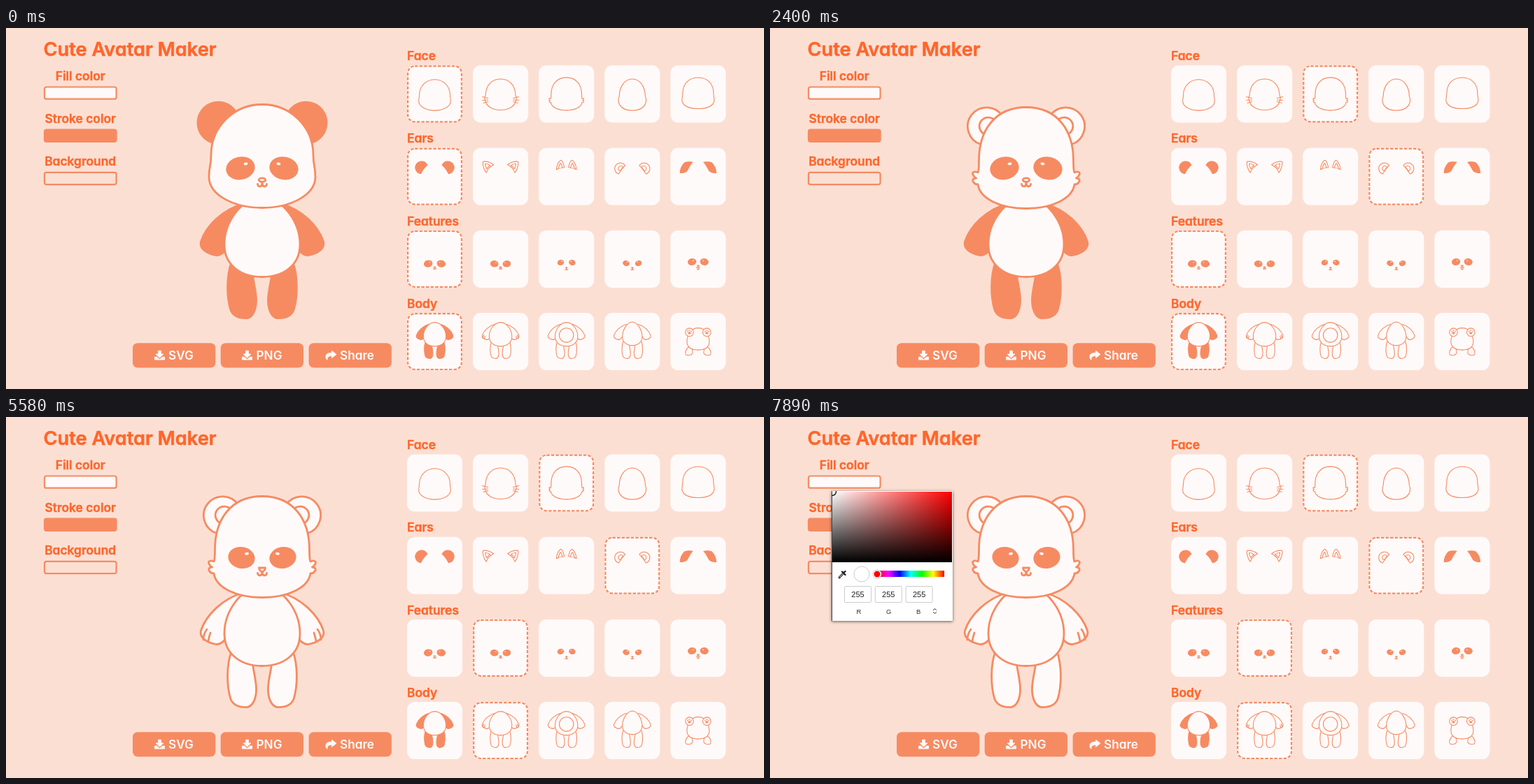
Write an HTML page that moves like this. It is 1083 px wide and 517 px high and loops after 8000 ms.

```html
<!DOCTYPE html>
<html lang="en">
<head>
<meta charset="utf-8">
<title>Cute Avatar Maker</title>
<style>
:root { --bg: #fcdfd3; --ink: #f68b62; --snow: #fffafa; --text: #ff662b; }
html, body { margin: 0; width: 100%; height: 100%; overflow: hidden; background: var(--bg); }
svg { display: block; }
#stage { position: absolute; left: 0; top: 0; }

text { font: 600 17.4px Inter, "Open Sans", sans-serif; font-feature-settings: "cv11"; fill: var(--text); stroke: var(--text); stroke-width: .4; stroke-linejoin: round; }
.title { font-size: 27.2px; stroke-width: .6; }
.label { text-anchor: middle; }
.button text { font-size: 17.2px; fill: var(--snow); stroke: none; }
.button rect { fill: var(--ink); }
.button path { fill: var(--snow); stroke: var(--snow); stroke-width: .8; stroke-linejoin: round; }
.tile { fill: var(--snow); }
.ring { fill: none; stroke: var(--ink); stroke-width: 2.2; stroke-dasharray: 4.4 2.18; }
.swatch { stroke: var(--ink); stroke-width: 2.2; }
.art { fill: var(--snow); stroke: var(--ink); stroke-width: 2.8; stroke-linecap: round; stroke-linejoin: round; }
.small { stroke-width: 1.1; }
.shrunk { stroke-width: 3.6; }
.solid { fill: var(--ink); }
.line { fill: none; }
.glint { fill: var(--snow); stroke: none; }

.off, .on { animation: 8s step-end infinite; }
.face.off { animation-name: face-off; }
.face.on { animation-name: face-on; }
.ears.off { animation-name: ears-off; }
.ears.on { animation-name: ears-on; }
.features.off { animation-name: features-off; }
.features.on { animation-name: features-on; }
.body.off { animation-name: body-off; }
.body.on { animation-name: body-on; }
.shadow.on { animation-name: shadow-on; }
.panel.on { animation-name: panel-on; }
@keyframes face-off { 0% { opacity: 1 } 10.875%, 100% { opacity: 0 } }
@keyframes face-on { 0% { opacity: 0 } 10.875%, 100% { opacity: 1 } }
@keyframes ears-off { 0% { opacity: 1 } 30%, 100% { opacity: 0 } }
@keyframes ears-on { 0% { opacity: 0 } 30%, 100% { opacity: 1 } }
@keyframes features-off { 0% { opacity: 1 } 48.375%, 100% { opacity: 0 } }
@keyframes features-on { 0% { opacity: 0 } 48.375%, 100% { opacity: 1 } }
@keyframes body-off { 0% { opacity: 1 } 69.75%, 100% { opacity: 0 } }
@keyframes body-on { 0% { opacity: 0 } 69.75%, 100% { opacity: 1 } }
@keyframes shadow-on { 0% { opacity: 0 } 97.875%, 100% { opacity: 1 } }
@keyframes panel-on { 0% { opacity: 0 } 98.625%, 100% { opacity: 1 } }

.shadow, .panel { position: absolute; left: 88px; top: 106px; width: 173px; height: 186px; }
.shadow { box-shadow: 0 1px 4px rgba(0, 0, 0, .62); }
.panel { background: #fff; overflow: hidden; }
.panel svg { position: absolute; left: 0; top: 0; }
.panel text { font: 11px "Liberation Sans", Arial, sans-serif; fill: #222; stroke: none; text-anchor: middle; }
.panel .unit { font-size: 9.5px; fill: #333; }
.shade { position: absolute; left: 1px; top: 1px; width: 171px; height: 101px; background: linear-gradient(to top, #000, transparent), linear-gradient(to right, #fff, #f00); }
.hue { position: absolute; left: 65px; top: 114px; width: 96px; height: 9px; background: linear-gradient(to right, #f00, #f0f, #00f, #0ff, #0f0, #ff0, #f00); }
</style>
</head>
<body>
<svg id="stage" width="1083" height="517" viewBox="0 0 1083 517"></svg>
<div class="shadow on"></div>
<div class="panel on">
  <div class="shade"></div>
  <div class="hue"></div>
  <svg id="picker" width="173" height="186"></svg>
</div>
<script>
const path = (d, kind = '') => `<path class="${kind}" d="${d}"/>`;
const oval = (x, y, rx, ry, kind = '', turn = 0) =>
  `<ellipse class="${kind}" cx="${x}" cy="${y}" rx="${rx}" ry="${ry}" transform="rotate(${turn} ${x} ${y})"/>`;
const mirror = s => s + `<g transform="scale(-1 1)">${s}</g>`;
const group = (s, kind, move = '') => `<g class="${kind}" transform="${move}">${s}</g>`;
const label = (s, x, y, kind = '') => `<text class="${kind}" x="${x}" y="${y}">${s}</text>`;
const box = (x, y, w, h, r, more) => `<rect x="${x}" y="${y}" width="${w}" height="${h}" rx="${r}" ${more}/>`;

// Avatar parts: x is measured from the axis of symmetry.
const roundFace = mirror(path('M0 109.5C41 109.5 73 142 73 182C73 199 76 197 76 213C76 240 39 257.5 0 257.5'));
const tuftFace = mirror(path('M0 113.5C44 113.5 67.500 146 67.500 190C67.500 200 67.500 205 69 207C73 205 78 206 76 210C75 213 73 214 71.500 215C77 215.500 77 219 75 221C73.500 224 71 224 69 224C66 244 38 258.500 0 258.500'));

const pandaEars = mirror(path('M35.500 124A29.500 29.500 0 1 1 66 165C59 150 49 135 35.500 124Z', 'solid'));
const bearEars = mirror(
  path('M34 126A27 27 0 1 1 65 166.500C57 152 46 138 34 126Z') +
  path('M44 133.500A12.500 12.500 0 1 1 58 152.500Z'));

const mouth = path('M0 221V223C.5 228 6.500 228 6.500 223.500', 'line');
const eye = (x, y, rx, ry, turn, gx, gy) =>
  oval(x, y, rx, ry, 'solid', turn) + oval(gx, gy, 2.9, 1.9, 'glint', 10);
const softEyes = mirror(eye(31, 200.8, 19.4, 15, 12, 23.5, 194.6) + mouth) + oval(0, 217.6, 4.8, 2.8);
const sharpEyes = mirror(eye(29.5, 201.5, 17.8, 14, -10, 22, 195.8) + mouth) +
  path('M-4.5 216H4.5C4.500 219 1.500 221.500 0 221.500S-4.500 219 -4.500 216Z');

const limbs = kind => mirror(
  path('M44 336C51 355 51 385 45 404C41 414 31 416 21 415.500C13 414 8 402 8.500 388C9 375 13 362 14 350', kind) +
  path('M28 252C56 260 80 283 87.500 306C90 316 79 323 66 325.500C58 326 51 317 47 309', kind));
const belly = mirror(path('M0 243C31 243 54 280 54 310C54 340 30 356.500 0 356.500'));
const slimBelly = mirror(path('M0 241C22 241 47 276 47 312C47 338 26 353 0 353'));
const fingers = mirror(path('M79 304C82 308 84 314 84 319M74 309C75 313 77 318 77 322', 'line'));
const pandaBody = limbs('solid') + belly;
const bearBody = limbs('') + belly + fingers;

// Thumbnails: big parts shrink, the rest is drawn in tile units.
const shrink = (s, top = 42, k = .3) => group(s, 'art shrunk', `scale(${k}) translate(0 ${-top})`);
const tiny = s => group(s, 'art small');
const tinyEyes = (x, y, rx, ry, turn) =>
  mirror(oval(x, y, rx, ry, 'solid', turn) + oval(x - 1.6, y - 1.7, .9, .6, 'glint'));
const tinyMouth = mirror(path('M0 53.500V55.500C.3 57 1.800 57 2 55.800', 'line')) + path('M-1.200 53H1.200L0 54Z', 'solid');

const rows = [
  { name: 'Face', kind: 'face', from: 0, to: 2, thumbs: [
    shrink(roundFace),
    tiny(mirror(path('M0 19.500C14 19.500 21 30 21.500 43C23 46 22.500 50 21.500 52C19 60 10 64 0 64') +
      path('M18 47L26 45M18 49.500L26 50M18 52L24.500 54', 'line'))),
    shrink(tuftFace, 60, .324),
    tiny(mirror(path('M0 19.500C11 19.500 18.500 31 18.500 44C20 47 20 50 19.500 53C17 61 9 64.500 0 64.500'))),
    tiny(mirror(path('M0 17.500C14 17.500 22 27 22 40C22 45 23.500 47 23 51C21 59 11 62 0 62'))),
  ] },
  { name: 'Ears', kind: 'ears', from: 0, to: 3, thumbs: [
    shrink(pandaEars),
    tiny(mirror(path('M10 24C14 21 20 19 25 19.500C26 24 24 31 20.500 35.500C19 31 15 26.500 10 24Z') +
      path('M15 25C18 23 20 22.500 22 22.500C22 26 21 28 19.500 30C18.500 27.500 17 26 15 25Z'))),
    tiny(mirror(path('M3 28C4 23 6 18 8 17.500C11 19 14 25 14.300 31C11 29 7 28 3 28Z') +
      path('M6 28C6.500 25 7.500 22.500 8.500 22C10 24 11 27 11.500 29.500'))),
    shrink(bearEars),
    tiny(mirror(path('M8 20.500C12 20 16 20 19 21C23.500 25 25.500 31 25.700 35.800C22 36 18 35 16 33C13.500 29 11.500 24 8 20.500Z', 'solid'))),
  ] },
  { name: 'Features', kind: 'features', from: 0, to: 1, thumbs: [
    shrink(softEyes),
    shrink(sharpEyes),
    tiny(tinyEyes(8.2, 46, 4.2, 3.5, 15) + tinyMouth),
    tiny(tinyEyes(8.8, 47, 4.3, 3.4, -18) + tinyMouth),
    tiny(tinyEyes(8.8, 45, 5.6, 4.4, 10) + oval(0, 50.7, 1.5, .8) +
      mirror(path('M0 52V53C1 54 2 53.500 2.300 52.700', 'line')) + path('M-1.300 53.500C-1.300 57 1.300 57 1.300 53.500')),
  ] },
  { name: 'Body', kind: 'body', from: 0, to: 1, thumbs: [
    shrink(pandaBody, 198),
    shrink(bearBody, 198),
    shrink(limbs('') + belly + oval(0, 304, 34, 34), 198),
    shrink(limbs('') + slimBelly, 198),
    tiny(mirror(path('M13 48C18 52 19 57 17.500 60C14 61.500 9 60.500 8 57.500C8 55 8 53 9 51')) +
      mirror(path('M0 21.500C10 21.500 15.500 30 16 41C16 49 10 53 0 53')) +
      mirror(oval(12.4, 27.6, 5.8, 5.8) + oval(12.4, 28.8, 1.5, 1.1, 'solid') +
        [[9.9, 26.4], [12.4, 25], [14.9, 26.4]].map(([x, y]) => oval(x, y, .35, .35, 'solid')).join(''))),
  ] },
];

const shelf = rows.map(({ name, kind, from, to, thumbs }, r) => {
  const top = 53.5 + 118.2 * r;
  const left = i => 573 + 94.1 * i;
  const tiles = thumbs.map((thumb, i) =>
    box(left(i), top, 79, 82, 11, 'class="tile"') +
    group(thumb, '', `translate(${left(i) + 39.5} ${top})`)).join('');
  const ring = (i, state) => box(left(i) + 1.1, top + 1.1, 76.8, 79.8, 10, `class="ring ${kind} ${state}"`);
  return label(name, 573, 46.2 + 118.2 * r) + tiles + ring(from, 'off') + ring(to, 'on');
}).join('');

const swap = (kind, before, after) => group(before, kind + ' off') + group(after, kind + ' on');
const avatar = group(
  swap('body', pandaBody, bearBody) + swap('ears', pandaEars, bearEars) +
  swap('face', roundFace, tuftFace) + swap('features', softEyes, sharpEyes),
  'art', 'translate(366 0)');

const controls = [['Fill color', '#fffafa'], ['Stroke color', '#f68b62'], ['Background', '#fcdfd3']]
  .map(([name, fill], i) => label(name, 106.2, 75 + 61.2 * i, 'label') +
    box(55, 84.5 + 61.2 * i, 102.6, 17.2, 2.8, `class="swatch" fill="${fill}"`)).join('');

const download = 'M5.5 .4h4v4.800h3.400L7.5 10.500 2.100 5.200h3.400ZM.4 9.300h3l4.100 3.700 4.100-3.700h3v4H.4Z';
const share = 'M9 .5L15.600 5.600 9 10.700V7.800C3.500 7.800 2 10 2.600 13.500C1 12.500 .4 11 .4 9C.4 5 3.500 3.400 9 3.400Z';
const buttons = [['SVG', 181, 212, 232, download], ['PNG', 306.7, 337, 357.5, download], ['Share', 432.6, 456.5, 477, share]]
  .map(([name, x, iconX, textX, icon]) => group(
    box(x, 451.3, 118.3, 35.2, 7, '') +
    `<path d="${icon}" transform="translate(${iconX} 461.8)"/>` +
    label(name, textX, 475.2), 'button')).join('');

document.getElementById('stage').innerHTML =
  label('Cute Avatar Maker', 53.5, 40.3, 'title') + controls + buttons + avatar + shelf;

const fields = ['R', 'G', 'B'].map((unit, i) =>
  box(18.5 + 43.8 * i, 136.5, 38, 23, 1, 'fill="#fff" stroke="#ccc"') +
  label(255, 37.5 + 43.8 * i, 152) + label(unit, 39 + 42.6 * i, 176, 'unit')).join('');
document.getElementById('picker').innerHTML = fields +
  '<path d="M.5 0V186" stroke="#444"/>' +
  '<circle cx="1" cy="1" r="5.500" fill="none" stroke="#222" stroke-width="1.500"/>' +
  '<circle cx="43" cy="119" r="11" fill="#fff" stroke="#ccc"/>' +
  '<circle cx="65" cy="119" r="5.200" fill="#f00" stroke="#aaa" stroke-width="2.400"/>' +
  '<circle cx="65" cy="119" r="5.200" fill="#f00" stroke="#fff" stroke-width="1.400"/>' +
  '<g fill="none" stroke="#222" stroke-linecap="round">' +
  '<path d="M11 124L17 117.500" stroke-width="2.800"/><path d="M11.500 123.500L16.500 118" stroke="#fff"/>' +
  '<path d="M15 115.500L19.500 120M17.500 117L19.500 115" stroke-width="2.400"/>' +
  '<path d="M145.500 170.500L147.500 168.500L149.500 170.500M145.500 173.500L147.500 175.500L149.500 173.500"/></g>';
</script>
</body>
</html>
```
